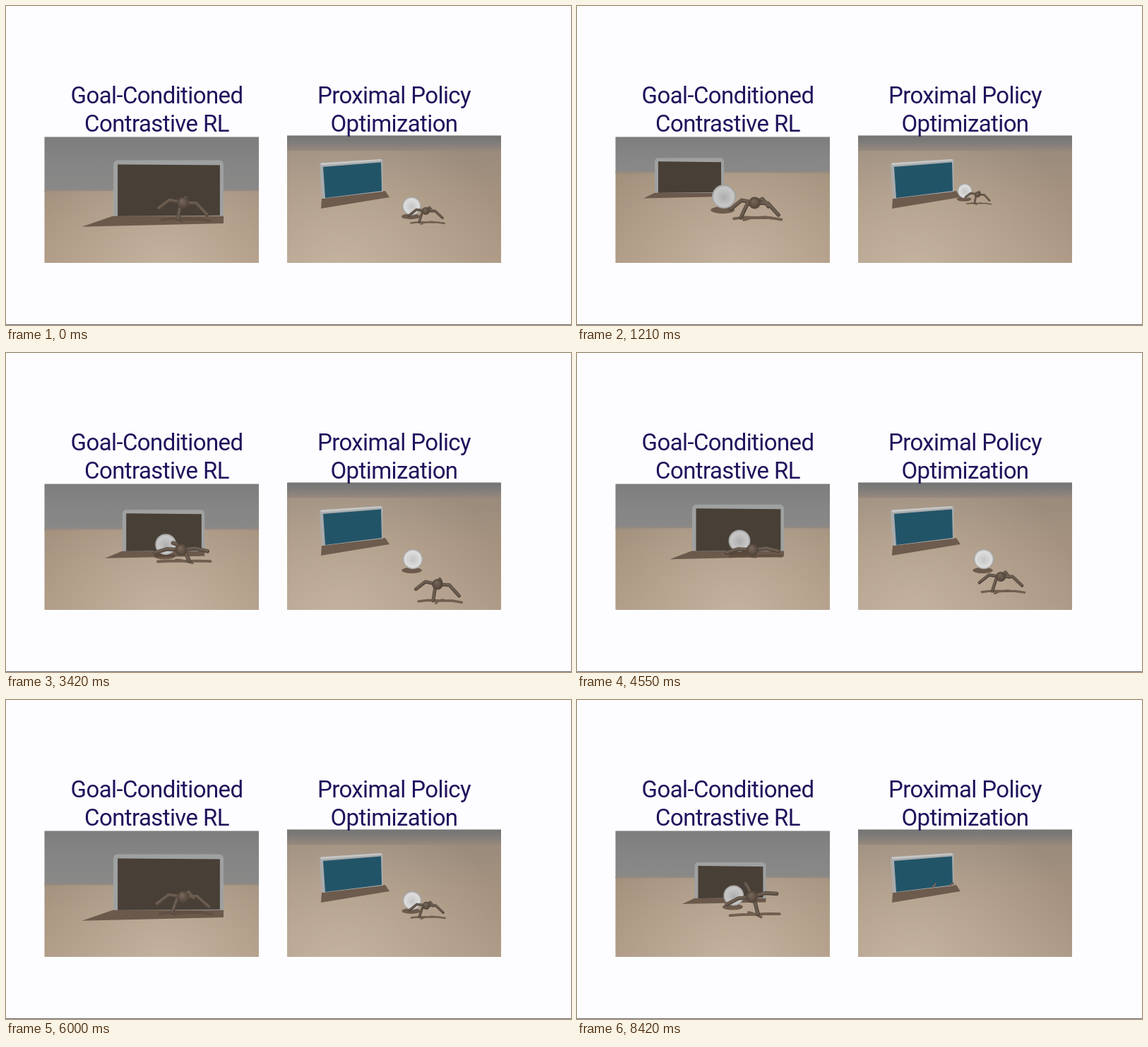
Recreate the animation shown at these times as an HTML page with a canvas. Size 800x452 px, loop 8.45 s.

```html
<!DOCTYPE html>
<html lang="en">
<head>
<meta charset="utf-8">
<title>Goal-Conditioned Contrastive RL and Proximal Policy Optimization</title>
<style>
  html, body { margin: 0; width: 100%; height: 100%; overflow: hidden; background: #fdfdff; }
  canvas, svg { position: absolute; left: 0; top: 0; width: 800px; height: 452px; }
  text { font: 400 33px Roboto, "Open Sans", sans-serif; letter-spacing: -.6px; fill: #21125c; text-anchor: middle; }
</style>
</head>
<body>
<canvas id="stage" width="800" height="452"></canvas>
<svg viewBox="0 0 800 452">
  <text x="213.5" y="137.5">Goal-Conditioned</text>
  <text x="213.5" y="177.5">Contrastive RL</text>
  <text x="549.5" y="137.5">Proximal Policy</text>
  <text x="549.5" y="177.5">Optimization</text>
  <rect y="451" width="800" height="1" fill="#68686a"/>
</svg>
<script>
const LOOP = 8450;
const ctx = document.getElementById('stage').getContext('2d');

// The left camera follows the ant, so the goal and the ball drift around it.
const leftRun = { from: 450, period: 6265, moments: [
  { t: 450, horizon: 238, goal: 138, width: 93, bx: 233, by: 272, br: 17, yaw: .6, drop: 12, tilt: .3 },
  { t: 1210, horizon: 236, goal: 110, width: 98, bx: 208, by: 270, br: 17, yaw: .5, drop: 13, tilt: .25 },
  { t: 2165, horizon: 252, goal: 167, width: 101, bx: 222, by: 277, br: 14.5, yaw: -.3, drop: 3, tilt: .6 },
  { t: 4550, horizon: 248, goal: 163, width: 130, bx: 230, by: 266, br: 15.5, yaw: -.1, drop: 3, tilt: .15 },
  { t: 6000, horizon: 262, goal: 152, width: 156, bx: 230, by: 264, br: 15, yaw: .3, drop: 12, tilt: .3 }
] };

// The right camera stands still; sizes follow from the distance.
const rightRun = { from: 3000, period: 6050, moments: [
  { t: 3000, bx: 576, by: 292, ax: 615, ay: 332 },
  { t: 4550, bx: 576, by: 292, ax: 600, ay: 317 },
  { t: 6020, bx: 575, by: 284, ax: 595, ay: 291 },
  { t: 7265, bx: 549, by: 262, ax: 567, ay: 267 },
  { t: 8230, bx: 510, by: 255, ax: 528, ay: 257 },
  { t: 8400, bx: 502, by: 254, ax: 520, ay: 259 }
] };

const clamp = u => Math.min(1, Math.max(0, u));
const vanish = (t, start, length) => 1 - clamp((t - start) / length);

// State of a run at time t, blended between the moments around it.
function stateAt({ from, period, moments }, time) {
  const t = from + (time - from + period) % period;
  const i = Math.max(1, moments.findIndex(m => m.t > t));
  const next = t >= moments.at(-1).t ? moments.length - 1 : i;
  const a = moments[next - 1], b = moments[next];
  const u = clamp((t - a.t) / (b.t - a.t));
  const state = {};
  for (const key in a) state[key] = a[key] + (b[key] - a[key]) * u;
  state.t = t;
  return state;
}

function poly(points, fill) {
  ctx.beginPath();
  points.forEach(([x, y]) => ctx.lineTo(x, y));
  ctx.closePath();
  ctx.fillStyle = fill;
  ctx.fill();
}

function fade(x, y, w, h, stops) {
  const g = ctx.createLinearGradient(0, y, 0, y + h);
  stops.forEach(([at, color]) => g.addColorStop(at, color));
  ctx.fillStyle = g;
  ctx.fillRect(x, y, w, h);
}

function glow(x, y, r, top) {
  const g = ctx.createRadialGradient(x, y, 0, x, y, r);
  g.addColorStop(0, 'rgba(206,189,170,.7)');
  g.addColorStop(1, 'rgba(206,189,170,0)');
  ctx.fillStyle = g;
  ctx.fillRect(x - r, top, 2 * r, 366 - top);
}

function disc(x, y, rx, ry, fill) {
  ctx.beginPath();
  ctx.ellipse(x, y, rx, ry, 0, 0, 7);
  ctx.fillStyle = fill;
  ctx.fill();
}

function ball(x, y, r, alpha, core, light) {
  ctx.globalAlpha = alpha;
  disc(x - r * .1, y + r * 1.12, r, r * .3, 'rgba(84,66,54,.75)');
  const g = ctx.createRadialGradient(x, y + r * .1, 0, x, y, r);
  g.addColorStop(0, core);
  g.addColorStop(.8, light);
  g.addColorStop(1, '#9a9a99');
  disc(x, y, r, r, g);
  ctx.globalAlpha = 1;
}

// Four legs a quarter turn apart; the swing makes the ant walk.
function makeLegs(r, yaw, drop, tilt, t) {
  const reach = r * 4.4;
  return [0, 1, 2, 3].map(i => {
    const swing = .12 * Math.sin(t / 75) * (i % 2 ? -1 : 1);
    const angle = yaw + swing + i * Math.PI / 2;
    const x = reach * Math.cos(angle), y = reach * tilt * Math.sin(angle);
    return { knee: [x * .55, y * .5 - r * .2], foot: [x, y + drop] };
  });
}

function strokeLegs(x, y, legs, flat, width, color) {
  ctx.beginPath();
  for (const { knee, foot } of legs) {
    ctx.moveTo(x, y);
    ctx.lineTo(x + knee[0], y + knee[1] * flat);
    ctx.lineTo(x + foot[0], y + foot[1] * flat);
  }
  ctx.lineWidth = width;
  ctx.strokeStyle = color;
  ctx.stroke();
}

function ant(x, y, r, legs, alpha = 1) {
  const ground = Math.max(...legs.map(leg => leg.foot[1]));
  ctx.globalAlpha = alpha;
  ctx.lineCap = ctx.lineJoin = 'round';
  strokeLegs(x + r * .5, y + ground, legs, .15, r * .45, 'rgba(96,77,63,.8)');
  strokeLegs(x, y, legs, 1, r * .64, '#51453b');
  strokeLegs(x - .3, y - .6, legs, 1, r * .38, '#6c5d51');
  const g = ctx.createRadialGradient(x - r * .2, y - r * .4, 0, x, y, r);
  g.addColorStop(0, '#7b6a5d');
  g.addColorStop(1, '#4f4238');
  disc(x, y, r, r, g);
  ctx.globalAlpha = 1;
}

function panel(x, y, w, h, paint) {
  ctx.save();
  ctx.beginPath();
  ctx.rect(x, y, w, h);
  ctx.clip();
  paint();
  ctx.restore();
}

function leftGoal(x, width, horizon) {
  const right = x + width, bottom = horizon + 18 + width * .12;
  const height = width * .515, top = bottom - height, bar = 3 + width * .02;
  const dx = height * .95 - 32, dy = height * .25 - 6;
  poly([[x - dx, bottom + dy], [x + 2, bottom - 2], [right, bottom - 2], [right, bottom + dy * .65]], '#6b594b');
  ctx.beginPath();
  ctx.roundRect(x, top, width, height - 1, [bar, bar, 0, 0]);
  ctx.fillStyle = '#9fa1a1';
  ctx.fill();
  poly([[x + bar, top + bar], [right - bar + 1, top + bar + 1], [right - bar + 1, bottom - 2], [x + bar, bottom - 1]], '#483f36');
}

function drawLeft(time) {
  const s = stateAt(leftRun, time);
  panel(54.5, 185.5, 303.5, 178.5, () => {
    fade(54, 185, 305, s.horizon - 184, [[0, '#7d7d7d'], [.5, '#858585'], [1, '#8a8988']]);
    fade(54, s.horizon - 1.5, 305, 366 - s.horizon, [[0, '#938880'], [.04, '#a3917d'], [1, '#ad9984']]);
    glow(225, 375, 210, s.horizon);
    leftGoal(s.goal, s.width, s.horizon);
    ball(s.bx, s.by, s.br, vanish(s.t, 4600, 300), '#adadad', '#c8c8c8');
    ant(249 + s.yaw * 5, 279, 8.5, makeLegs(8.5, s.yaw, s.drop, s.tilt, s.t));
  });
}

function rightGoal() {
  poly([[447, 273], [446, 287], [543, 271], [537, 262]], '#6d5b4d');
  poly([[444, 225], [446, 222.5], [531, 217], [533.5, 219], [533.5, 263], [447, 273]], '#a9abac');
  poly([[445, 224], [446, 222.5], [531, 217], [533, 219], [447, 225.5]], '#c6c7c7');
  poly([[449, 228], [531, 221.5], [532, 262], [452, 272]], '#225468');
}

// Leg tips that poke out of the pane once the ant is inside.
function legTips(alpha) {
  ctx.globalAlpha = alpha;
  ctx.beginPath();
  ctx.moveTo(504, 265);
  ctx.lineTo(507.5, 261);
  ctx.moveTo(529, 262);
  ctx.lineTo(533, 260);
  ctx.lineWidth = 2.6;
  ctx.strokeStyle = '#7a6459';
  ctx.stroke();
  ctx.globalAlpha = 1;
}

function drawRight(time) {
  const s = stateAt(rightRun, time);
  const r = (s.ay - 193.5) * .0567, shown = vanish(s.t, 8320, 80);
  panel(398, 183.5, 303, 180.5, () => {
    fade(398, 183, 304, 182, [[0, '#747474'], [.06, '#807d7a'], [.13, '#9a8b7c'], [.45, '#a4927e'], [1, '#ad9a86']]);
    glow(475, 375, 240, 205);
    rightGoal();
    ball(s.bx, s.by, (s.by - 182) * .13, vanish(s.t, 8300, 80), '#c4c4c4', '#dedede');
    ant(s.ax, s.ay, r, makeLegs(r, .3, r * 1.5, .35, s.t), shown);
    legTips(1 - shown);
  });
}

const start = performance.now();
function draw() {
  const time = (performance.now() - start) % LOOP;
  ctx.clearRect(0, 0, 800, 452);
  drawLeft(time);
  drawRight(time);
  requestAnimationFrame(draw);
}
draw();
</script>
</body>
</html>
```
